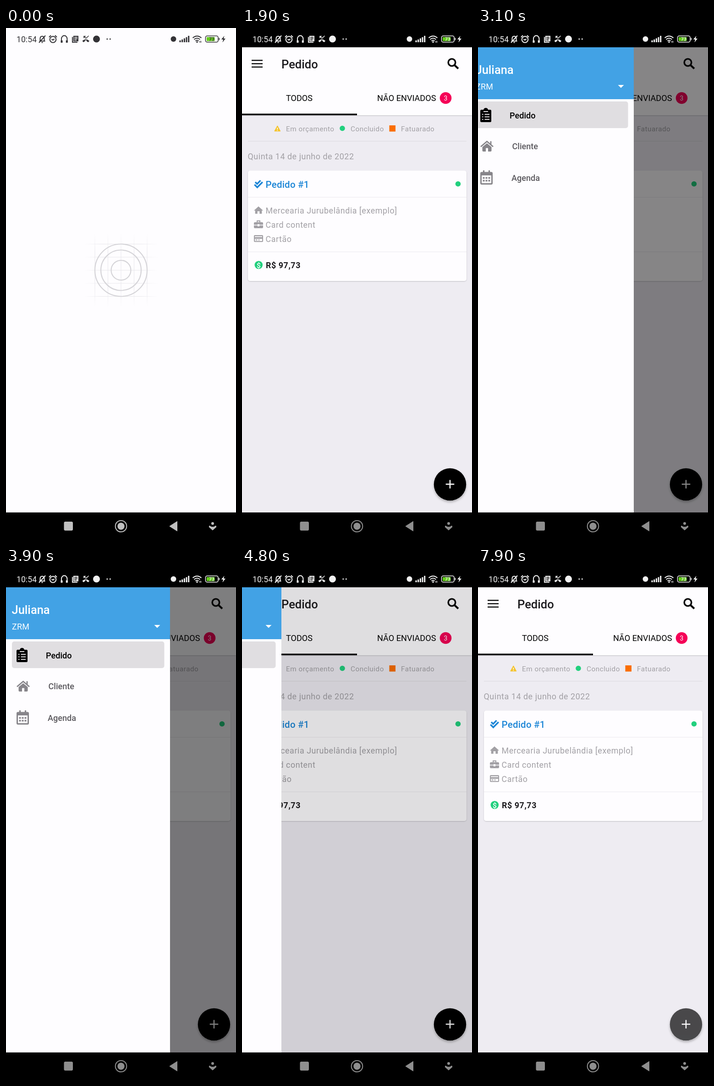
An HTML page that plays this animation: 502x1115 px, repeating every 8 s.

```html
<!DOCTYPE html>
<html lang="pt-BR">
<head>
<meta charset="utf-8">
<title>Pedido</title>
<style>
  html, body { margin: 0; width: 100%; height: 100%; overflow: hidden; background: #000; }
  svg { display: block; width: 502px; height: 1115px; font-family: Roboto, sans-serif; }
  .line { fill: none; stroke: currentColor; stroke-width: 2; }
  .tab { font-size: 18.1px; }
  .caption { font-size: 15.3px; letter-spacing: .5px; fill: #a2a0a5; }
  .body { font-size: 17.9px; letter-spacing: .55px; fill: #a2a0a5; }
  .menu { font-size: 18.1px; font-weight: 500; }
  .title { font-size: 25.5px; font-weight: 500; }
</style>
</head>
<body>
<svg viewBox="0 0 502 1115">
  <defs>
    <linearGradient id="fadeX" gradientUnits="userSpaceOnUse" x1="169" x2="333" y1="0" y2="0">
      <stop offset="0" stop-color="#e9e8ec" stop-opacity="0"/><stop offset=".25" stop-color="#e9e8ec"/>
      <stop offset=".75" stop-color="#e9e8ec"/><stop offset="1" stop-color="#e9e8ec" stop-opacity="0"/>
    </linearGradient>
    <linearGradient id="fadeY" href="#fadeX" gradientUnits="userSpaceOnUse" x1="0" x2="0" y1="446" y2="609"/>
    <filter id="shadow" x="-20%" y="-20%" width="140%" height="150%">
      <feDropShadow dx="0" dy="3" stdDeviation="2.5" flood-opacity=".28"/>
    </filter>
    <filter id="soft" x="-5%" y="-5%" width="110%" height="115%">
      <feDropShadow dx="0" dy="1" stdDeviation="1" flood-opacity=".2"/>
    </filter>
  </defs>

  <g id="app">
    <rect y="42" width="502" height="1013" fill="#eeecf2"/>
    <rect y="42" width="502" height="148" fill="#fefdff" filter="url(#soft)"/>
    <path d="M21 70.5h24M21 77.7h24M21 85h24" stroke="#111" stroke-width="2.5"/>
    <text class="title" x="86" y="88" fill="#1c1b1e">Pedido</text>
    <g fill="none" stroke="#0c0c0c" stroke-width="3.6">
      <circle cx="458" cy="75" r="7.8"/><path d="M463.5 80.5l8.5 8" stroke-width="4.4"/>
    </g>
    <text class="tab" x="96" y="159.3">TODOS</text>
    <text class="tab" x="295" y="159.3">NÃO ENVIADOS</text>
    <circle cx="444.5" cy="152.5" r="12.8" fill="#f50057"/>
    <text x="444.5" y="157.5" font-size="14" fill="#fff" text-anchor="middle">3</text>
    <rect y="186.5" width="251" height="3.5"/>

    <path d="M77.3 213.5l6 11h-12z" fill="#f4c430" stroke="#f4c430" stroke-width="1.6" stroke-linejoin="round"/>
    <path d="M77.3 217v4M77.3 222.3v1.6" stroke="#fff" stroke-width="1.5"/>
    <circle cx="219" cy="218.5" r="5.8" fill="#22d07e"/>
    <rect x="321.5" y="212" width="13.5" height="13.5" fill="#fa6e00"/>
    <text class="caption" x="96" y="225">Em orçamento</text>
    <text class="caption" x="237" y="225">Concluido</text>
    <text class="caption" x="347" y="225">Fatuarado</text>
    <path d="M13 246.5h477" stroke="#dcdadf"/>
    <text class="body" x="12.5" y="286">Quinta 14 de junho de 2022</text>

    <rect x="13" y="310.5" width="477" height="240.5" rx="5" fill="#fefdff" filter="url(#soft)"/>
    <path d="M13 368.5h477M13 487.5h477" stroke="#ebe9ee"/>
    <path d="M29 335.5l4 4 7.5-7.5M27.3 341l6 6 11.5-11.5" fill="none" stroke="#1c86d6" stroke-width="3.4"/>
    <text x="51.5" y="347.5" font-size="20.5" font-weight="500" letter-spacing=".2" fill="#1c86d6">Pedido #1</text>
    <circle cx="471.5" cy="339.5" r="5.8" fill="#22d07e"/>
    <g fill="#a2a0a5">
      <path d="M36 388.5l10 9h-2.7v7h-5v-5.5h-4.6v5.500h-5v-7H26z"/>
      <path d="M32 423v-4h8v4h4q2 0 2 2v3.500h-8v-1.500h-4v1.500h-8V425q0-2 2-2zm2 0h4v-2h-4zM26 430h8v2h4v-2h8v4q0 2-2 2H28q-2 0-2-2z"/>
      <path fill-rule="evenodd" d="M28 451h16q2 0 2 2v11q0 2-2 2H28q-2 0-2-2v-11q0-2 2-2zm0 2.500v2h16v-2zm0 5.500v5h16v-5zm1.500 1.500h4v2h-4zm6 0h3v2h-3z"/>
    </g>
    <text class="body" x="51.5" y="404">Mercearia Jurubelândia [exemplo]</text>
    <text class="body" x="51.5" y="435">Card content</text>
    <text class="body" x="51.5" y="466">Cartão</text>
    <circle cx="36.300" cy="516" r="8.8" fill="#22d07e"/>
    <text x="36.300" y="521.5" font-size="15.500" font-weight="500" fill="#fff" text-anchor="middle">$</text>
    <text class="body" x="52" y="522.5" font-weight="700" style="fill:#1c1b1e">R$ 97,73</text>

    <g filter="url(#shadow)">
      <circle cx="454" cy="994" r="35.3" fill="#eeecf2"/>
    </g>
    <g id="fab">
      <circle cx="454" cy="994" r="35.3"/>
      <path d="M444.700 993.500h18.600M454 984.200v18.600" stroke="#fff" stroke-width="2.500"/>
    </g>
  </g>

  <rect id="scrim" y="42" width="502" height="1013"/>
  <g id="drawer">
    <rect y="42" width="358" height="1013" fill="#fefdff"/>
    <rect y="42" width="358" height="113" fill="#42a2e5"/>
    <text class="title" x="12.500" y="100" fill="#fff">Juliana</text>
    <text x="13" y="134" font-size="17.900" fill="#fff" letter-spacing=".3">ZRM</text>
    <path d="M323.500 124h13l-6.500 6.500z" fill="#fff"/>
    <rect x="13" y="160" width="332.500" height="58" rx="5" fill="#e0dee1"/>
    <path d="M25.500 178h4.500q1-4 5-4t5 4h4.500q2.500 0 2.500 2.500v22q0 2.500-2.500 2.500h-19q-2.500 0-2.500-2.500v-22q0-2.500 2.500-2.500z"/>
    <path d="M30 182h10M32.500 188H43M32.500 193.500H43M32.500 199H43M27 188h2.500M27 193.500h2.500M27 199h2.500" stroke="#e0dee1" stroke-width="2"/>
    <text class="menu" x="87" y="196.500">Pedido</text>
    <g fill="#87858a">
      <path d="M37.500 251l10 8.300V267q0 2-2 2h-5.500v-7.500h-5V269h-5.500q-2 0-2-2v-7.700z"/>
      <path d="M24 258.500L37.500 247 51 258.500M46 246.500v7" fill="none" stroke="#87858a" stroke-width="2.800"/>
      <path fill-rule="evenodd" d="M26 313.500h21q3 0 3 3V338q0 3-3 3H26q-3 0-3-3v-21.500q0-3 3-3zm0 7.500v17h21v-17z"/>
      <path d="M30.500 310v6M42.500 310v6" stroke="#87858a" stroke-width="3.200"/>
      <path d="M28.500 326.500h16M28.500 332.500h16" stroke="#87858a" stroke-width="3.700" stroke-dasharray="4 2"/>
    </g>
    <g fill="#5d5b60">
      <text class="menu" x="92.500" y="264.300">Cliente</text>
      <text class="menu" x="91" y="332.800">Agenda</text>
    </g>
  </g>

  <g id="splash">
    <rect y="42" width="502" height="1013" fill="#fefdff"/>
    <path d="M169 470.500h164M169 499h164M169 527.500h164M169 556h164M169 584.500h164" stroke="url(#fadeX)"/>
    <path d="M194 446v163M222.500 446v163M251 446v163M279.500 446v163M308 446v163" stroke="url(#fadeY)"/>
    <g fill="none" stroke="#d5d4d8" stroke-width="2.200">
      <circle cx="251" cy="527.500" r="57"/><circle cx="251" cy="527.500" r="44"/><circle cx="251" cy="527.500" r="21.500"/>
    </g>
  </g>

  <rect id="statusBar" width="502" height="42"/>
  <g id="status" fill="currentColor">
    <text x="23" y="31" font-size="17.500" letter-spacing=".1">10:54</text>
    <path class="line" d="M73 28.500h12.500M74.500 28v-5q0-5 4.500-5t4.500 5v5M77.500 31.500h3M72 32l14-15.500"/>
    <circle class="line" cx="102.500" cy="25" r="6.800"/>
    <path class="line" d="M94 20l4-4M111 20l-4-4M99.500 24l3 2.500 3-3"/>
    <path class="line" d="M121 30v-6.500a6.200 7 0 0 1 12.400 0V30"/>
    <path d="M119.500 27h4v5h-4zM130.800 27h4v5h-4z"/>
    <path fill-rule="evenodd" d="M147 17h11v12h-11zm2 2.500v1.500h7v-1.500zm0 3v1.500h7v-1.500zm0 3v1.500h5v-1.500z"/>
    <path class="line" d="M145 19.500v11.500h11"/>
    <path d="M166.500 28q7.500-6.500 15.500 0l-2.500 3-3.500-2v-2q-2-.7-3.800 0v2l-3.200 2z"/>
    <path class="line" stroke-width="1.500" d="M170 22v-4h4M170.500 18.500l4 4 6-5.500" style="stroke-width:1.500"/>
    <circle cx="197.500" cy="24" r="7.500"/>
    <circle cx="220.800" cy="24" r="1.500"/><circle cx="227.300" cy="24" r="1.500"/>
    <circle cx="365.500" cy="24" r="6"/>
    <path class="line" style="stroke-width:3" d="M380 31v-4M384.700 31v-6M389.400 31v-8.500M394 31V20M398.700 31V17"/>
    <path class="line" d="M407.500 21.500q9.500-8 19 0M410.500 25q6.500-5.500 13 0M413.500 28.300q3.500-3 7 0"/>
    <circle cx="417" cy="30.500" r="1.800"/>
    <path class="line" style="stroke-width:1.200" d="M423 28v4M425.500 28v4"/>
    <rect class="line" x="435.500" y="17.300" width="27.500" height="13.500" rx="3.500" style="stroke-width:1.600"/>
    <rect x="438" y="19.700" width="17.500" height="8.700" rx="1" fill="#64cc1c"/>
    <text x="449" y="28" font-size="10.500" font-weight="500" text-anchor="middle">73</text>
    <rect x="464.500" y="21.500" width="1.700" height="5" rx=".8"/>
    <path d="M476.500 17l-6.500 8h4l-1.500 6.500 6.500-8.500h-4z"/>
  </g>

  <rect y="1055" width="502" height="60"/>
  <g id="nav" fill="currentColor">
    <rect x="126.500" y="1075" width="19.500" height="19.500" rx="3"/>
    <circle class="line" cx="251" cy="1085" r="12.300"/><circle cx="251" cy="1085" r="7.700"/>
    <path d="M357 1085l16.500-10.500v21z" stroke="currentColor" stroke-linejoin="round"/>
    <circle cx="451" cy="1079" r="3"/>
    <path d="M444 1083.500q7 5.500 14 0 2 2.500.5 4l-7.500 6.500-7.500-6.500q-1.500-1.500.5-4z"/>
  </g>
</svg>
<script>
  const LOOP = 8000, STEP = 100, DRAWER_WIDTH = 358, SETTLE = 100;
  const el = id => document.getElementById(id);
  const [splash, statusBar, status, nav, drawer, scrim, fab] =
    ['splash', 'statusBar', 'status', 'nav', 'drawer', 'scrim', 'fab'].map(el);
  const progress = (t, from, to) => Math.min(1, Math.max(0, (t - from) / (to - from)));

  // Both directions settle exponentially after a fast start.
  function drawerOpen(t) {
    if (t < 2900) return 0;
    if (t < 4700) return 1 - 0.372 * Math.exp((2900 - t) / SETTLE);
    return 0.24 * Math.exp((4800 - t) / SETTLE);
  }

  function render(t) {
    const started = t >= 1000;
    splash.setAttribute('opacity', 1 - progress(t, 900, 1400));
    statusBar.setAttribute('fill', started ? '#000' : '#fefdff');
    status.style.color = started ? '#f2f2f2' : '#333236';

    const grey = Math.round(192 - 50 * progress(t, 0, 800));
    nav.style.color = `rgb(${grey},${grey},${grey})`;

    const edge = Math.round(drawerOpen(t) * DRAWER_WIDTH);
    drawer.setAttribute('transform', `translate(${edge - DRAWER_WIDTH} 0)`);
    scrim.setAttribute('opacity', 0.5 * edge / DRAWER_WIDTH);
    fab.setAttribute('opacity', 1 - 0.31 * progress(t, 7700, 7900) ** 1.5);
  }

  const start = performance.now();
  function tick() {
    const t = (performance.now() - start) % LOOP;
    render(Math.floor(t / STEP) * STEP);
    requestAnimationFrame(tick);
  }
  tick();
</script>
</body>
</html>
```
